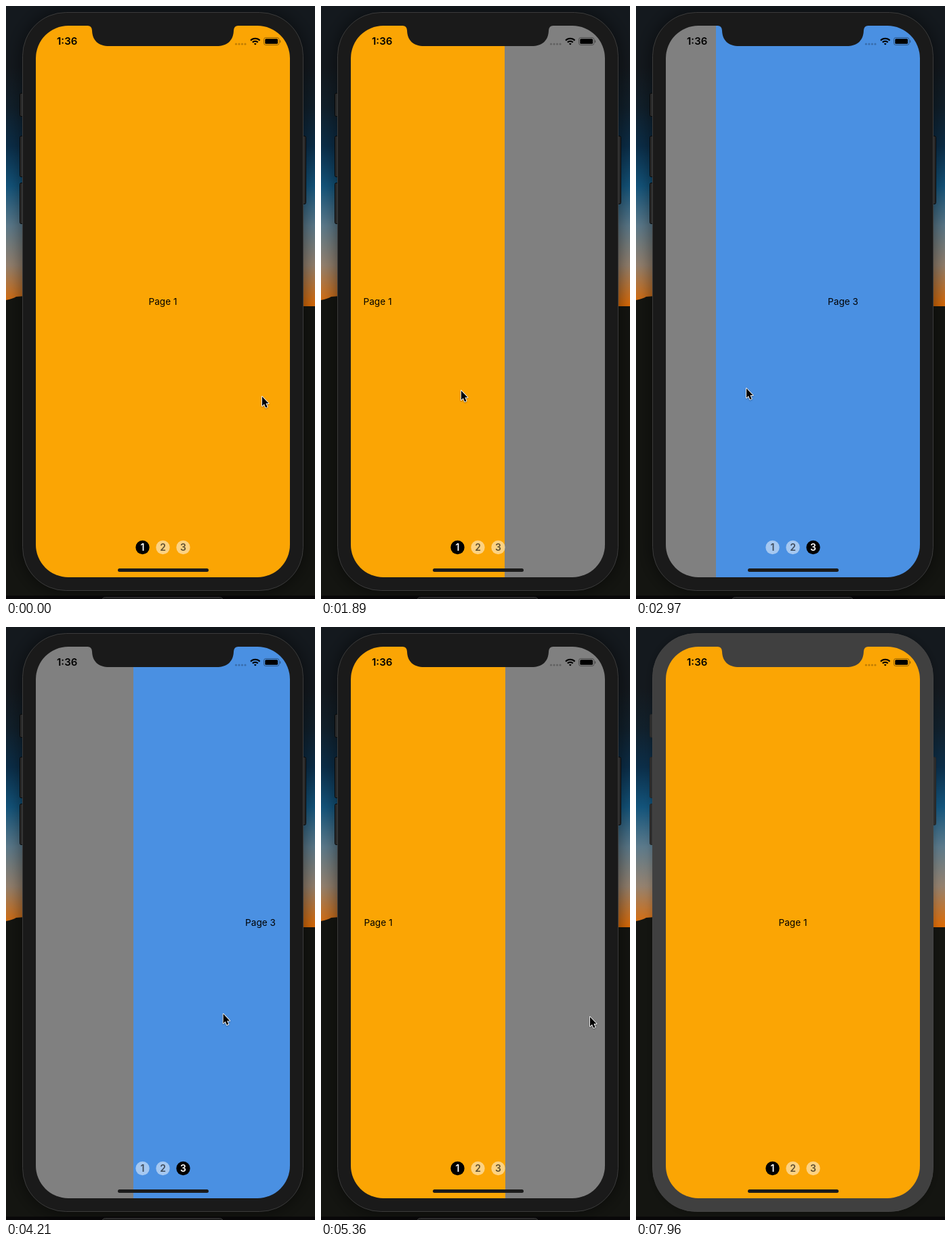
Recreate the animation shown at these times as an HTML page with a canvas. Size 456 px wide and 873 px high, loop 8060 ms.

```html
<!DOCTYPE html>
<html lang="en">
<head>
<meta charset="utf-8">
<title>Pager</title>
<style>
html, body { margin: 0; width: 100%; height: 100%; overflow: hidden; background: #13140f; }
canvas { display: block; width: 456px; height: 873px; }
</style>
</head>
<body>
<canvas id="stage"></canvas>
<script>
const W = 456, H = 873, LOOP = 8060, BLUR_AT = 7960, HIDE_AT = 6340;
const PAGE = 375, LEFT = 44, MID = LEFT + PAGE / 2;
const STEP = 88, SPEED = 0.82, SETTLE = 350;
const canvas = document.getElementById('stage');
const c = canvas.getContext('2d');
const dpr = window.devicePixelRatio || 1;
canvas.width = W * dpr;
canvas.height = H * dpr;

const FONT = 'Inter, Roboto, sans-serif';
const COLORS = ['#fba504', '#808080', '#4a90e2'];
const SKY = ['#14191e', '#11202b', '#0b2e49', '#13547b', '#5c7a8b', '#95826f', '#dc6c08'];
const ARROW = new Path2D('M1 1V14.8L4 12 6.3 17.2 8.7 16.2 6.5 11.1H10.6Z');

// Spans in which the picture advances; it rests in between.
const BURSTS = [[1710, 2340], [2790, 3230], [4030, 4820], [4910, 5630], [6250, HIDE_AT]];

const SWIPES = [
  { start: 1710, release: 1890, page: 1 },
  { start: 2710, release: 2878, page: 2 },
  { start: 4030, release: 4293, page: 1 },
  { start: 5082, release: 5360, page: 0 }
];

// Pointer hops: start, end, x, y.
const HOPS = [
  [1670, 1980, 162, 563], [2070, 2340, 343, 570], [2700, 2966, 162, 562],
  [4000, 4337, 400, 572], [4381, 4910, 164, 564], [5082, 5360, 396, 573],
  [6200, 6250, 394, 660]
];

const mix = (a, b, u) => a + (b - a) * u;
const clamp = u => Math.max(0, Math.min(1, u));
const smooth = u => u * u * (3 - 2 * u);

function snap(t) {
  let held = 0;
  for (const [a, b] of BURSTS) {
    if (t < a) break;
    const gap = (b - a) / Math.round((b - a) / STEP);
    held = Math.min(b, a + gap * Math.floor((t - a) / gap + 1e-6));
  }
  return held;
}

// Drag at a steady pace, then ease onto the page.
function scrollAt(t) {
  let x = 0, from = 0;
  for (const { start, release, page } of SWIPES) {
    if (t < start) break;
    const to = page * PAGE;
    const drag = SPEED * (Math.min(t, release) - start);
    const u = clamp((t - release) / SETTLE);
    x = mix(from + Math.sign(to - from) * drag, to, 1 - (1 - u) ** 4);
    from = to;
  }
  return x;
}

function pointerAt(t) {
  let x = 377, y = 574;
  for (const [a, b, toX, toY] of HOPS) {
    const u = smooth(clamp((t - a) / (b - a)));
    x = mix(x, toX, u);
    y = mix(y, toY, u);
  }
  return [x, y];
}

function box(x, y, w, h, r, fill, stroke) {
  c.beginPath();
  c.roundRect(x, y, w, h, r);
  if (fill) { c.fillStyle = fill; c.fill(); }
  if (stroke) { c.strokeStyle = stroke; c.lineWidth = 1; c.stroke(); }
}

function disc(x, y, r, fill) {
  c.beginPath();
  c.arc(x, y, r, 0, Math.PI * 2);
  c.fillStyle = fill;
  c.fill();
}

function label(s, x, y, size, weight, fill, align = 'center') {
  c.font = `${weight} ${size}px ${FONT}`;
  c.textAlign = align;
  c.fillStyle = fill;
  c.fillText(s, x, y);
}

function backdrop(active) {
  const sky = c.createLinearGradient(0, 90, 0, 440);
  SKY.forEach((color, i) => sky.addColorStop(i / (SKY.length - 1), color));
  c.fillStyle = sky;
  c.fillRect(0, 0, W, H);
  c.beginPath();
  c.moveTo(0, 433);
  c.quadraticCurveTo(10, 431, 15, 428);
  c.lineTo(40, 426);
  c.lineTo(400, 442);
  c.lineTo(W, 442);
  c.lineTo(W, H);
  c.lineTo(0, H);
  c.fillStyle = '#141511';
  c.fill();
  c.fillStyle = '#090809';
  c.fillRect(0, 868, W, 5);
  if (active) box(141.5, 870.5, 179, 20, 5, '#202020', '#424242');
}

function body(active) {
  const shell = active ? '#1a1a1a' : '#404040';
  c.save();
  c.shadowColor = active ? 'rgba(0,0,0,.6)' : 'rgba(0,0,0,.3)';
  c.shadowBlur = (active ? 28 : 14) * dpr;
  box(25, 10, 413, 850, 64, shell);
  c.restore();
  const key = active ? '#2a2a2a' : '#2d2d2d', rim = active ? '#080808' : '#252525';
  for (const [y, h] of [[128.5, 34], [191.5, 60], [260.5, 60]]) box(20.5, y, 6, h, 2, key, rim);
  box(436.5, 191.5, 6, 100, 2, key, rim);
  box(24.5, 9.5, 414, 851, 64, shell, active ? '#3b3b3b' : '#444444');
  return shell;
}

// One half is drawn and mirrored about the middle.
function notch(fill) {
  c.fillStyle = fill;
  for (const side of [-1, 1]) {
    c.save();
    c.translate(MID, 0);
    c.scale(side, 1);
    c.beginPath();
    c.moveTo(-1, 28);
    c.lineTo(111, 28);
    c.lineTo(111, 29);
    c.quadraticCurveTo(105, 29, 104.5, 36);
    c.bezierCurveTo(104, 51, 95, 59, 79, 59);
    c.lineTo(-1, 59);
    c.fill();
    c.restore();
  }
}

function statusBar() {
  label('1:36', 75, 57, 15, 600, '#000', 'left');
  for (let i = 0; i < 4; i++) disc(339.5 + i * 4.5, 56, 1.6, 'rgba(0,0,0,.24)');
  const a = -Math.PI * 0.75, b = -Math.PI * 0.25;
  c.strokeStyle = '#000';
  c.lineWidth = 2.2;
  for (const r of [1.6, 5.6, 9.6]) {
    c.beginPath();
    c.arc(367.8, 57.5, r, a, b);
    c.stroke();
  }
  box(380.5, 46.5, 22.5, 11, 3, null, 'rgba(0,0,0,.38)');
  box(382.3, 48.3, 18.8, 7.4, 1.5, '#000');
  box(404, 50.3, 1.3, 3.6, 1, 'rgba(0,0,0,.4)');
}

function screen(scroll) {
  c.save();
  c.beginPath();
  c.roundRect(LEFT, 29, PAGE, 812, 48);
  c.clip();
  COLORS.forEach((color, i) => {
    const x = i * PAGE - scroll;
    c.fillStyle = color;
    c.fillRect(LEFT + x, 29, PAGE + 1, 812);
    label(`Page ${i + 1}`, MID + x, 440, 13.6, 400, '#000');
  });
  c.restore();
  const current = Math.round(scroll / PAGE);
  for (let i = 0; i < 3; i++) {
    const x = MID + (i - 1) * 30, on = i === current;
    disc(x, 797, 10.2, on ? '#000' : 'rgba(255,255,255,.5)');
    label(i + 1, x, 802, 14, 600, on ? '#fff' : 'rgba(0,0,0,.62)');
  }
  box(165, 828, 134, 5, 2.5, '#1b1b1b');
}

function pointer(x, y) {
  c.save();
  c.translate(x, y);
  c.shadowColor = 'rgba(0,0,0,.35)';
  c.shadowBlur = 2 * dpr;
  c.shadowOffsetY = dpr;
  c.lineWidth = 1.8;
  c.lineJoin = 'round';
  c.strokeStyle = '#fff';
  c.stroke(ARROW);
  c.shadowColor = 'transparent';
  c.fillStyle = '#000';
  c.fill(ARROW);
  c.restore();
}

function draw() {
  const t = performance.now() % LOOP;
  const step = snap(t), active = t < BLUR_AT;
  c.setTransform(dpr, 0, 0, dpr, 0, 0);
  backdrop(active);
  const shell = body(active);
  screen(Math.round(scrollAt(step)));
  notch(shell);
  statusBar();
  if (step < HIDE_AT) pointer(...pointerAt(step));
  requestAnimationFrame(draw);
}
draw();
</script>
</body>
</html>
```
